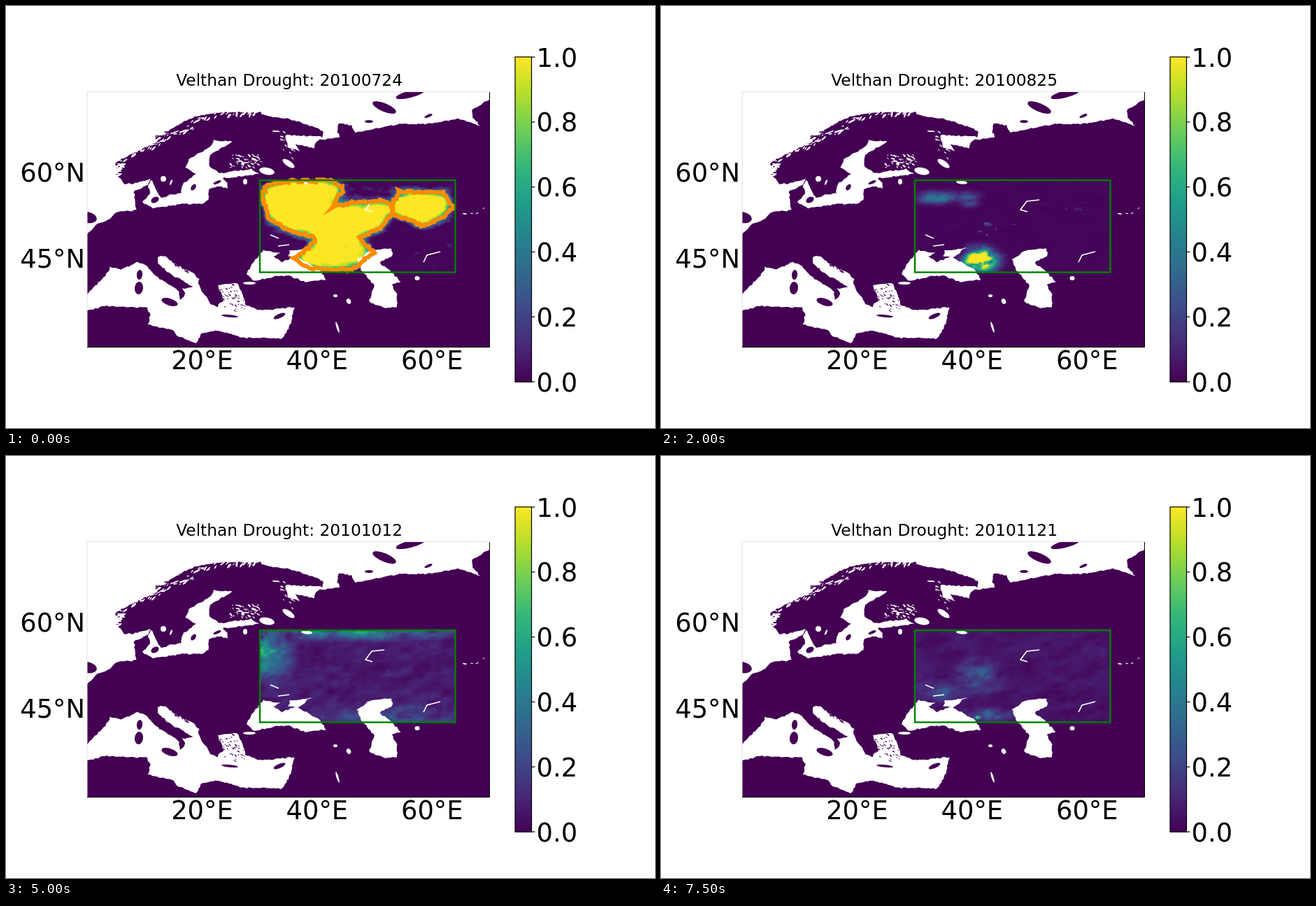
An HTML page with a canvas that plays this animation: 928x603 px, repeating every 8000 ms.

```html
<!DOCTYPE html>
<html lang="en">
<head>
<meta charset="utf-8">
<title>Velthan Drought</title>
<style>
html, body { margin: 0; width: 100%; height: 100%; overflow: hidden; background: #fff }
canvas { display: block }
</style>
</head>
<body>
<canvas id="stage" width="928" height="603"></canvas>
<script>
const W = 928, H = 603, STEP = 500, COUNT = 16, OUTLINE_END = 4;
const LAND = '#440154', FONT = '"DejaVu Sans", Verdana, sans-serif';
const map = { x: 116, y: 123, w: 575.5, h: 364.5 };
const box = { x: 363, y: 249, w: 279.5, h: 131.5, cols: 136, rows: 64 };
const ctx = stage.getContext('2d');

const clamp = v => Math.max(0, Math.min(1, v));
const mix = (a, b, t) => a + (b - a) * t;
const smooth = t => t * t * (3 - 2 * t);
const bell = d => Math.exp(-d * d);
const nums = s => s.trim().split(/\s+/).map(Number);
const hash = (x, y) => {
  const s = Math.sin(x * 127.1 + y * 311.7) * 43758.5453;
  return s - Math.floor(s);
};
let seed = 1;
const jitter = amp => (hash(seed++, 4) - .5) * 2 * amp;

function layer(w, h) {
  const c = document.createElement('canvas');
  c.width = w;
  c.height = h;
  return c.getContext('2d');
}

// Closed outline through a few key points, roughened in between
function ragged(text, amp, step = 3.5) {
  const p = nums(text), path = new Path2D();
  for (let i = 0; i < p.length; i += 2) {
    const x = p[i], y = p[i + 1], u = p[(i + 2) % p.length], v = p[(i + 3) % p.length];
    const n = Math.ceil(Math.hypot(u - x, v - y) / step);
    for (let k = 0; k < n; k++)
      path.lineTo(mix(x, u, k / n) + jitter(amp), mix(y, v, k / n) + jitter(amp));
  }
  path.closePath();
  return path;
}

// ---- Map ----
const seas = [
  // Atlantic and Norwegian Sea
  `100 327 116 325 131 312 149 304 158 294 186 292 183 264 203 256 208 247 182 254 170 254 159 242
   157 224 174 214 190 207 215 194 232 179 264 160 297 152 371 152 375 110 100 110`,
  // Kattegat and Baltic Sea
  `203 256 206 268 195 280 210 289 252 283 279 283 289 277 290 263 302 257 316 261 317 253 309 246
   346 242 362 239 350 233 305 239 291 230 291 213 324 194 297 192 293 201 262 218 257 231 271 240
   252 255 250 267 235 270 222 275 208 248`,
  // Barents and White Seas
  `365 110 365 155 412 163 453 178 452 187 399 184 403 202 420 207 414 197 440 203 446 192 477 188
   473 178 476 168 494 171 500 181 560 169 609 168 646 161 678 171 667 160 667 148 700 128 700 110`,
  // Western and central Mediterranean
  `100 413 116 411 142 386 149 373 165 377 188 366 200 370 217 388 246 406 249 419 257 411 252 404
   268 401 233 382 218 367 218 358 228 357 239 367 268 382 276 390 275 399 293 425 307 432 305 463
   280 467 272 482 243 470 240 464 203 455 206 442 202 431 141 429 100 439`,
  // Aegean and eastern Mediterranean
  `300 431 311 421 303 399 330 396 338 410 342 427 361 434 379 434 412 430 408 453 396 475 338 474 303 463`,
  // Black Sea and Sea of Azov
  `368 349 351 370 344 383 354 393 387 386 404 386 428 394 457 391 449 377 418 360 430 349 438 346
   406 350 404 357 416 358 394 366 383 358 392 353`,
  // Caspian Sea
  `502 362 519 350 552 346 552 358 534 366 552 381 565 394 551 398 559 412 559 430 543 432 519 423
   527 400 506 374`
];

// Ellipses: x y rx ry tilt
const islands = ['116 302 14 8 .2', '541 145 18 6 .4', '578 126 21 5 -.25', '519 165 6 2 0', '604 157 6 2 -.4',
  '268 259 3 5 .6', '302 252 6 2 -.4', '213 277 6 4 -.5', '191 384 4 7 .1', '190 403 6 9 .1',
  '234 423 12 5 .3', '320 443 12 1.8 .1', '391 443 9 3 -.4'];
const lakes = ['225 247 4 4 0', '236 252 1.3 4 .4', '373 236 11 5 .2', '404 225 10 4 .6', '342 251 3 4 0',
  '430 252 8 2.5 .1', '588 389 3.5 3 0', '348 396 9 2 0', '471 414 3 2 0', '490 422 3 4 -.5', '474 459 1.5 8 -.3'];
const rivers = 'M541 277L523 279L514 291L524 294M597 366L602 356L621 351M378 327L390 332M389 343L405 341';

const seaLayer = layer(W, H);
{
  const g = seaLayer;
  const ellipse = (x, y, rx, ry, tilt) => {
    g.beginPath();
    g.ellipse(x, y, rx, ry, tilt, 0, 7);
    g.fill();
  };
  // Small ellipses strewn along a line: fjords, lakes, skerries
  const strew = (n, x0, y0, x1, y1, spread, size, tilt) => {
    for (let i = 0; i < n; i++) {
      const t = (i + .5) / n, r = size + jitter(size / 2);
      ellipse(mix(x0, x1, t) + jitter(spread), mix(y0, y1, t) + jitter(spread),
        r, Math.max(.5, r * .3), tilt + jitter(.5));
    }
  };
  g.rect(map.x, map.y, map.w, map.h);
  g.clip();

  g.fillStyle = g.strokeStyle = '#fff';
  seas.forEach(s => g.fill(ragged(s, 1)));
  lakes.forEach(s => ellipse(...nums(s)));
  g.lineWidth = 1.6;
  g.stroke(new Path2D(rivers));
  strew(16, 162, 242, 163, 222, 4, 3.6, -.1);
  strew(50, 170, 217, 300, 154, 5, 3, -.5);
  strew(22, 305, 154, 360, 152, 4, 2.8, -1);
  strew(65, 326, 222, 362, 222, 9, 2, .5);
  strew(18, 385, 178, 412, 215, 9, 2, .6);
  strew(4, 648, 300, 690, 290, 3, 2, 0);

  g.fillStyle = LAND;
  islands.forEach(s => ellipse(...nums(s)));
  strew(22, 216, 188, 262, 165, 3, 2.6, -.6);
  strew(46, 315, 406, 332, 432, 11, 1.7, .5);
  strew(16, 236, 365, 262, 381, 2, 2.3, .6);
}

// Observed extent of the drought
const outlines = [
  `366 268 372 257 410 250 470 250 482 261 467 288 500 280 535 278 552 283 553 294 535 318 505 332
   526 352 505 370 490 377 435 375 413 362 440 338 440 330 405 321 376 305`,
  '553 285 562 265 625 266 640 287 625 302 597 315 552 296'
].map(s => ragged(s, 1.9, 4));

// ---- Drought field ----
const stops = '440154 482878 3e4989 31688e 26828e 1f9e89 35b779 6ece58 b5de2b fde725'.split(' ');
const rgb = stops.map(s => [0, 2, 4].map(i => parseInt(s.slice(i, i + 2), 16)));
function viridis(v) {
  const t = clamp(v) * 9, i = Math.min(8, Math.floor(t));
  return rgb[i].map((c, k) => mix(c, rgb[i + 1][k], t - i));
}

function noise(x, y) {
  const i = Math.floor(x), j = Math.floor(y), u = smooth(x - i), v = smooth(y - j);
  return mix(mix(hash(i, j), hash(i + 1, j), u), mix(hash(i, j + 1), hash(i + 1, j + 1), u), v);
}
const clouds = (c, r) => noise(c / 10, r / 5) * .55 + noise(c / 4, r / 2.5) * .3 + noise(c / 1.6, r / 1.2) * .15;

// Softened extent: 1 well inside, 0 well outside
const extent = (() => {
  const g = layer(box.cols, box.rows);
  g.scale(box.cols / box.w, box.rows / box.h);
  g.translate(-box.x, -box.y);
  g.filter = 'blur(3px)';
  outlines.forEach(p => g.fill(p));
  const { data } = g.getImageData(0, 0, box.cols, box.rows);
  return k => data[k * 4 + 3] / 255;
})();

// Where the drought lasts longest
const cores = ['400 282 38 28', '478 310 30 18', '578 288 32 20'].map(nums);

// Passing spots: x y rx ry level, then step of the peak and its duration
const spots = ['457 363 20 13 1.9 3.8 1.8', '396 274 26 9 .35 4 1.2', '440 276 16 9 .35 4 1.2',
  '585 297 3 3 1.2 8 1.2', '370 280 38 42 .45 10 1.7', '500 248 150 15 .42 10 1.7',
  '550 376 120 28 .22 10 1.8', '400 338 50 18 .25 14 2', '455 314 38 26 .25 15 1.6',
  '468 370 45 11 .3 14 2', '453 374 5 3 .9 14.5 4'].map(nums);

const near = (x, y, [cx, cy, rx, ry]) => bell(Math.hypot((x - cx) / rx, (y - cy) / ry));

function makeField(i) {
  const limit = .08 + .12 * i + .05 * i * i, rough = Math.min(1.3, .4 + .45 * i);
  const haze = .012 + .06 * bell((i - 10) / 1.7) + .04 * bell((i - 15) / 2);
  const now = spots.map(s => s[4] * bell((i - s[5]) / s[6]));
  const g = layer(box.cols, box.rows), img = g.createImageData(box.cols, box.rows);
  for (let k = 0; k < box.cols * box.rows; k++) {
    const c = k % box.cols, r = Math.floor(k / box.cols);
    const x = box.x + (c + .5) * box.w / box.cols, y = box.y + (r + .5) * box.h / box.rows;
    const core = Math.max(...cores.map(s => near(x, y, s)));
    const dry = extent(k) * (.85 + .35 * core) + (clouds(c, r) - .5) * rough - limit;
    const veil = clouds(c + 50 * i, r + c / 6);
    let v = haze * veil * 2;
    spots.forEach((s, j) => {
      if (now[j] > .01) v = Math.max(v, now[j] * near(x, y, s) * (.1 + 1.8 * veil));
    });
    img.data.set([...viridis(Math.max(v, dry * 1.5)), 255], k * 4);
  }
  g.putImageData(img, 0, 0);
  return g.canvas;
}
const fields = Array.from({ length: COUNT }, (_, i) => makeField(i));

// ---- Figure ----
function text(s, x, y, size, align) {
  ctx.font = `${size}px ${FONT}`;
  ctx.textAlign = align;
  ctx.fillText(s, x, y);
}

function draw(i) {
  ctx.fillStyle = '#fff';
  ctx.fillRect(0, 0, W, H);
  ctx.fillStyle = LAND;
  ctx.fillRect(map.x, map.y, map.w, map.h);
  ctx.imageSmoothingEnabled = false;
  ctx.drawImage(fields[i], box.x, box.y, box.w, box.h);
  ctx.drawImage(seaLayer.canvas, 0, 0);

  ctx.lineWidth = 1;
  ctx.strokeStyle = '#e4e4e4';
  ctx.strokeRect(116, 122.5, 575.5, 365);
  ctx.strokeStyle = '#000';
  ctx.stroke(new Path2D('M691.5 123V487.5H116'));

  if (i < OUTLINE_END) {
    ctx.strokeStyle = '#ff8c00';
    ctx.lineWidth = 6;
    outlines.forEach(p => ctx.stroke(p));
  }
  ctx.strokeStyle = '#008000';
  ctx.lineWidth = 2.4;
  ctx.strokeRect(box.x, box.y, box.w, box.h);

  const bar = ctx.createLinearGradient(0, 537, 0, 73);
  stops.forEach((s, k) => bar.addColorStop(k / 9, '#' + s));
  ctx.fillStyle = bar;
  ctx.fillRect(728, 73, 23.5, 464);
  ctx.strokeStyle = '#000';
  ctx.lineWidth = 1.2;
  ctx.strokeRect(728, 72.8, 23.5, 464.4);

  ctx.fillStyle = '#000';
  for (let k = 0; k <= 5; k++) {
    const y = 537 - k * 92.8;
    ctx.fillRect(751.5, y - .6, 4.8, 1.2);
    text((k / 5).toFixed(1), 758.6, y + 13.5, 36.8, 'left');
  }
  text('60°N', 113, 251, 36.8, 'right');
  text('45°N', 113, 374.3, 36.8, 'right');
  for (const d of [20, 40, 60]) text(d + '°E', 116 + d * 8.22, 519, 36.8, 'center');
  const day = new Date(Date.UTC(2010, 6, 24 + 8 * i)).toISOString().slice(0, 10).replace(/-/g, '');
  text('Velthan Drought: ' + day, 567, 114, 23.3, 'right');
}

let shown = -1;
const start = performance.now();
function tick() {
  const i = Math.floor((performance.now() - start) / STEP) % COUNT;
  if (i !== shown) draw(shown = i);
  requestAnimationFrame(tick);
}
tick();
</script>
</body>
</html>
```
